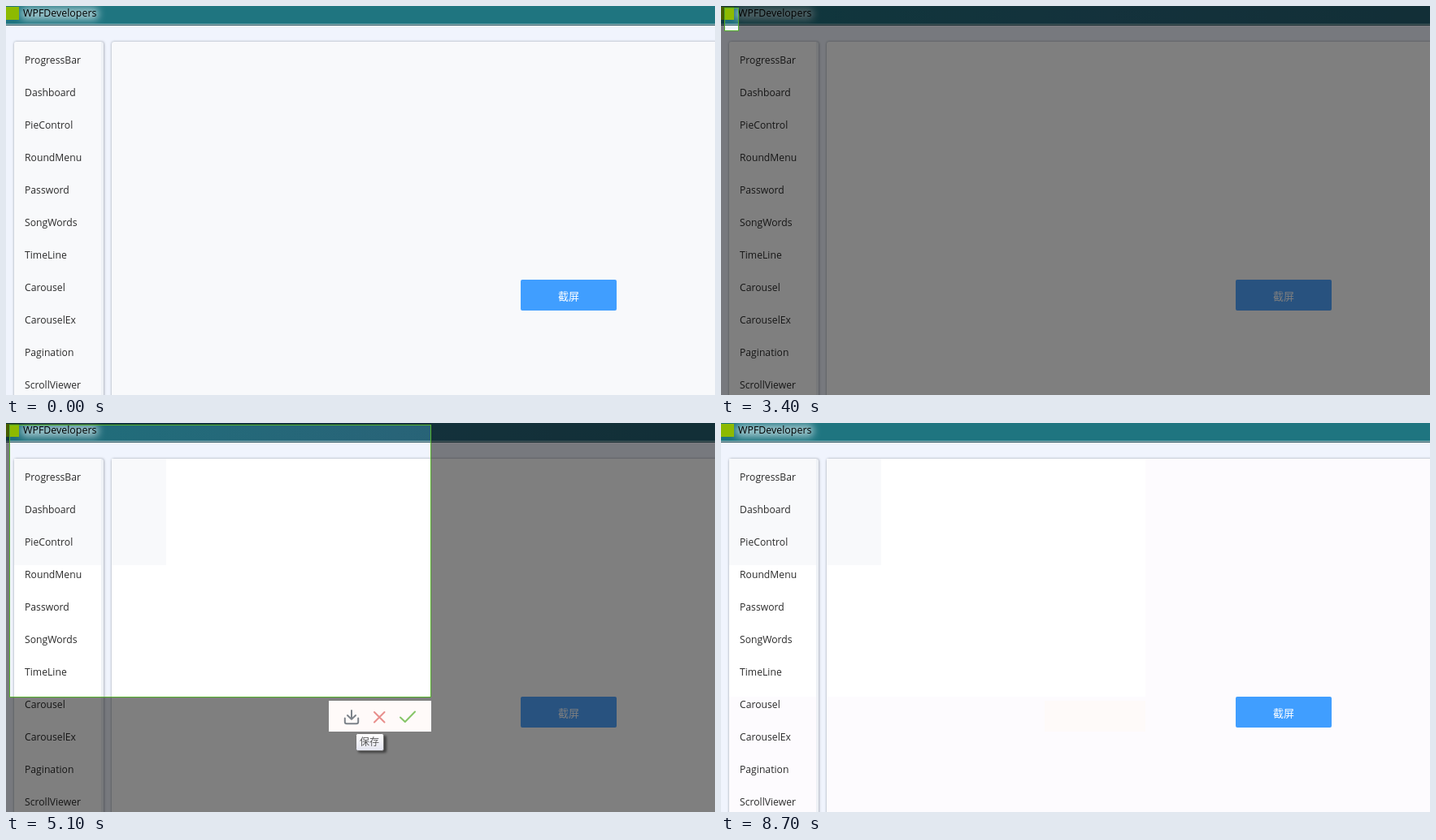
Recreate the animation shown at these times as an HTML page. Size 872 by 479 pixels, loop 8800 ms.

```html
<!DOCTYPE html>
<html lang="zh">
<head>
<meta charset="utf-8">
<title>WPFDevelopers</title>
<style>
html, body { margin: 0; width: 100%; height: 100%; overflow: hidden; background: #f0f4fd; }
svg { display: block; width: 872px; height: 479px; }
text { font-family: "Open Sans", "Noto Sans CJK SC", "Noto Sans CJK", sans-serif; }
.cjk { font-family: "Noto Sans CJK SC", "Noto Sans CJK", sans-serif; }
.icon { fill: none; stroke-width: 2; stroke-linecap: round; stroke-linejoin: round; }
</style>
</head>
<body>
<svg viewBox="0 0 872 479">
  <defs>
    <linearGradient id="idle">
      <stop offset="0" stop-color="#1f6f7b"/>
      <stop offset=".55" stop-color="#286478"/>
      <stop offset="1" stop-color="#245e6e"/>
    </linearGradient>
    <linearGradient id="tipFill" x2="0" y2="1">
      <stop offset="0" stop-color="#fff"/>
      <stop offset="1" stop-color="#e4e5f0"/>
    </linearGradient>
    <filter id="glow" x="-30%" y="-80%" width="160%" height="260%"><feGaussianBlur stdDeviation="5"/></filter>
    <filter id="soft" x="-10%" y="-10%" width="120%" height="120%"><feGaussianBlur stdDeviation="1.5"/></filter>
    <clipPath id="top"><rect width="872" height="22"/></clipPath>
    <clipPath id="panels"><path d="M10 44H117V479H10ZM130 44H872V479H130Z"/></clipPath>
  </defs>

  <rect width="872" height="479" fill="#f0f4fd"/>
  <rect id="bar" width="872" height="22"/>
  <g clip-path="url(#top)">
    <rect x="18" y="2" width="96" height="15" rx="6" fill="#c4dde2" opacity=".75" filter="url(#glow)"/>
  </g>
  <rect y="22" width="872" height="1" fill="#a3c5cc"/>
  <rect y="23" width="872" height="1" fill="#1d4a54"/>
  <rect y="1" width="16" height="16" fill="#8dba00"/>
  <text x="21" y="13" font-size="12.4">WPFDevelopers</text>

  <g fill="#5c6470" opacity=".6" filter="url(#soft)">
    <rect x="10" y="44" width="110.5" height="450" rx="3"/>
    <rect x="130" y="44" width="760" height="450" rx="3"/>
  </g>
  <rect x="10" y="44" width="110" height="450" rx="3" fill="#eef1f6"/>
  <g id="sheets">
    <path d="M13 44H117V490H10V47Q10 44 13 44Z"/>
    <rect x="130" y="44" width="760" height="450" rx="3"/>
  </g>
  <g clip-path="url(#panels)">
    <rect id="patch" y="44" width="522" height="293" fill="#fff"/>
    <rect id="tint" y="44" fill="#f8f9fb"/>
  </g>
  <rect id="trace" x="398" y="342" width="124" height="38" fill="#fefaf9"/>
  <g id="menu" font-size="12.2" fill="#2b2b2b"></g>
  <rect id="button" x="633" y="337" width="118" height="38" rx="2"/>
  <text class="cjk" x="679" y="362" font-size="13" fill="#fff">截屏</text>

  <path id="shade" fill="#000" fill-opacity=".5" fill-rule="evenodd"/>
  <rect id="frame" x="4.5" y="2.5" fill="none" stroke="#55b02b"/>

  <g id="tools">
    <rect x="397" y="342" width="126" height="38" fill="#fffaf9"/>
    <path class="icon" stroke="#7d838a" stroke-width="1.8" d="M425 354V364.5M420 360L425 364.8L430 360M416.8 363.5V368Q416.8 370.2 419 370.2H431Q433.2 370.2 433.2 368V363.5"/>
    <path class="icon" stroke="#de5f5c" d="M453 356L465.5 368.5M465.5 356L453 368.5"/>
    <path class="icon" stroke="#52ae2a" d="M485 362.5L490.8 368L503 355.5"/>
  </g>
  <g id="tip">
    <rect x="3" y="3" width="35" height="21" rx="2" fill="#000" opacity=".5" filter="url(#soft)"/>
    <rect x=".5" y=".5" width="34" height="21" rx="2" fill="url(#tipFill)" stroke="#767676"/>
    <text id="tipText" class="cjk" x="5" y="15" font-size="12" fill="#575757"></text>
  </g>
</svg>
<script>
const LOOP = 8800;
const $ = id => document.getElementById(id);
const set = (el, attrs) => { for (const k in attrs) el.setAttribute(k, attrs[k]); };
const show = (el, on) => { el.style.display = on ? '' : 'none'; };

const items = ['ProgressBar', 'Dashboard', 'PieControl', 'RoundMenu', 'Password', 'SongWords',
  'TimeLine', 'Carousel', 'CarouselEx', 'Pagination', 'ScrollViewer'];
$('menu').innerHTML = items.map((s, i) => `<text x="23" y="${71 + i * 40}">${s}</text>`).join('');

const SAVE = 0, CANCEL = 1, DONE = 2;
const labels = ['保存', '取消', '完成'];
const icons = document.querySelectorAll('.icon');

// time, right, bottom of the selection
const drag = [
  [3400, 22, 31], [3500, 100, 98], [3600, 197, 175], [3700, 300, 235], [3800, 390, 280],
  [3900, 460, 312], [4000, 505, 331], [4100, 523, 338]
];
// time, hovered tool, tooltip opacity, tooltip x, tooltip y
const hover = [
  [4200, -1, 0], [4600, DONE, 0], [4700, DONE, .5, 474, 382], [4800, DONE, 1, 474, 382],
  [4900, CANCEL, 0], [5000, SAVE, .5, 430, 382], [5100, SAVE, 1, 430, 382],
  [5600, CANCEL, .5, 445, 385], [5700, CANCEL, 1, 445, 385],
  [6000, DONE, 0], [6100, DONE, .5, 475, 385], [6200, DONE, 1, 475, 385],
  [7300, CANCEL, 0], [7400, CANCEL, .5, 473, 385], [7500, CANCEL, 1, 473, 385],
  [7800, CANCEL, .5, 473, 385]
];
const at = (steps, t) => steps.filter(s => s[0] <= t).pop();

function draw(t) {
  const capture = t >= 1000 && t < 7900;
  const closed = t >= 7900;
  const sel = at(drag, t);
  const [, x, y] = sel || [0, 4, 2];

  set($('bar'), { fill: t >= 800 && t < 8700 ? 'url(#idle)' : '#1f7580' });
  set($('button'), { fill: t >= 700 && capture | t < 1000 && t >= 700 ? '#50a5ff' : '#409eff' });
  set($('sheets'), { fill: capture ? '#fff' : closed ? '#fdfbfe' : '#f8f9fb' });
  show($('patch'), closed);
  show($('trace'), closed);
  show($('tint'), sel);
  set($('tint'), { width: Math.min(x, 197), height: Math.max(0, Math.min(y, 175) - 44) });

  show($('shade'), capture);
  set($('shade'), { d: 'M0 0H872V479H0Z' + (sel ? `M4 2H${x}V${y}H4Z` : '') });
  show($('frame'), capture && sel);
  set($('frame'), { width: x - 5, height: y - 3 });

  const h = capture && at(hover, t);
  show($('tools'), h);
  show($('tip'), h && h[2]);
  if (!h) return;
  const [, tool, alpha, tx, ty] = h;
  icons.forEach((el, i) => set(el, { opacity: i === tool ? 1 : .7 }));
  if (alpha) {
    set($('tip'), { opacity: alpha, transform: `translate(${tx} ${ty})` });
    $('tipText').textContent = labels[tool];
  }
}

const start = performance.now();
function tick() {
  draw((performance.now() - start) % LOOP);
  requestAnimationFrame(tick);
}
tick();
</script>
</body>
</html>
```
